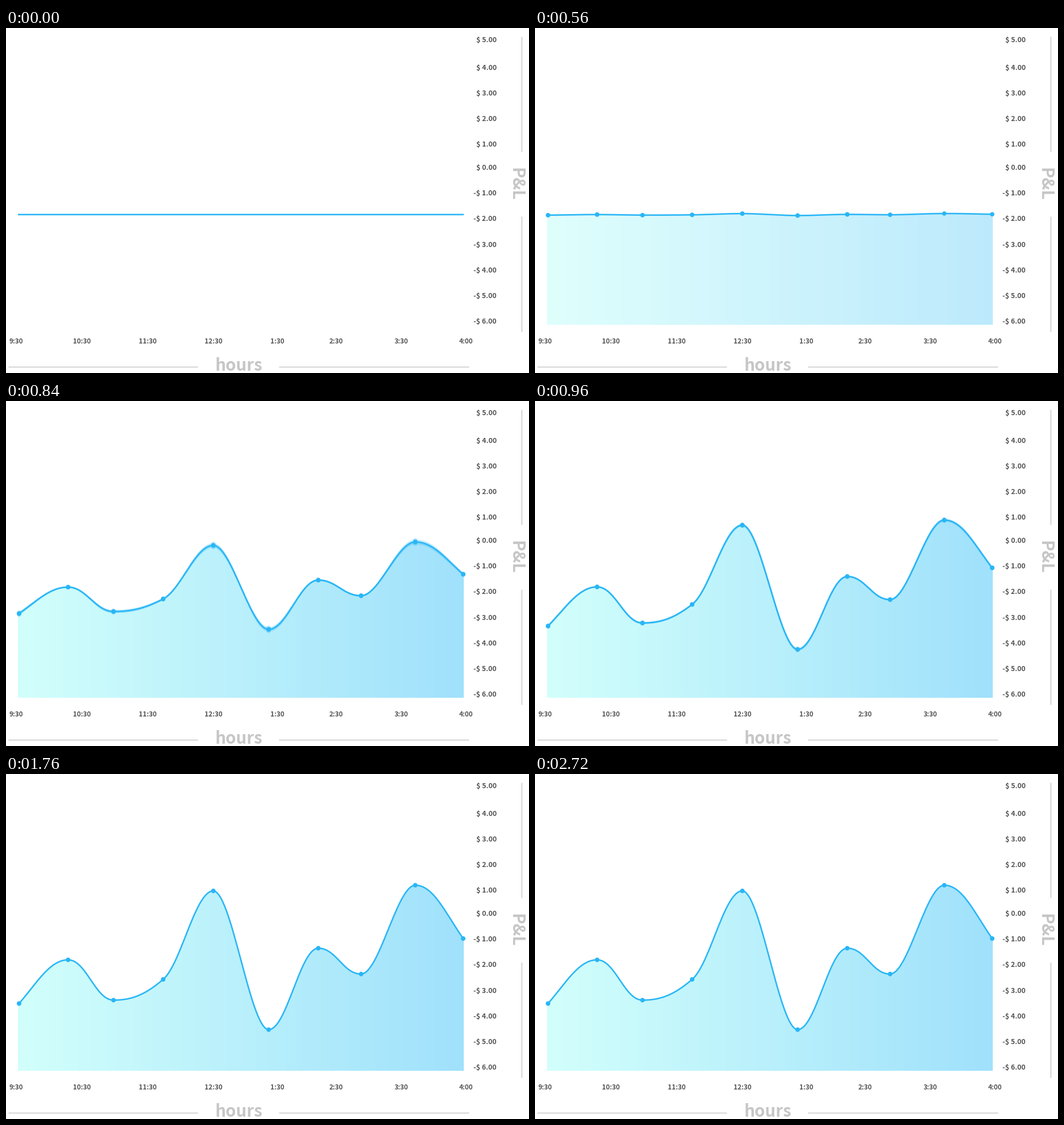
Write a matplotlib script that moves like this. It is 922x608 px and loops after 2.8 s.

```python
import numpy as np
import matplotlib.pyplot as plt
from matplotlib.animation import FuncAnimation
from matplotlib.path import Path

W, H, DPI = 922, 608, 100
STEP, FRAMES = 40, 70
PX = 72 / DPI

BLUE, GREY, RULE, INK = "#29b6f6", "#c6c6c6", "#b2b2b2", "#555555"
FILL_A, FILL_B = np.array([210, 255, 251]), np.array([160, 225, 252])
LEFT, RIGHT, FLOOR, BASE = 21, 807, 523, 328.8

DOTS = np.array([(23, 404.5), (109.5, 327.5), (189.5, 398.5), (277, 362),
                 (365.5, 206), (463, 450.5), (550.5, 307), (626, 352.5),
                 (721.5, 196), (806, 290)])
REACH = 32      # horizontal length of every curve handle
END_BEND = 1.3  # how much steeper the ends are than their chords
POP = np.linspace(40, 395, len(DOTS))

plt.rcParams["font.family"] = ["Noto Sans CJK JP", "DejaVu Sans"]
fig = plt.figure(figsize=(W / DPI, H / DPI), dpi=DPI, facecolor="white")
ax = fig.add_axes([0, 0, 1, 1])
ax.axis("off")


def label(x, y, text, size, color, **kw):
    ax.text(x, y, text, fontsize=size * PX, color=color, weight="bold",
            va="baseline", parse_math=False, **kw)


def rule(xs, ys):
    ax.plot(xs, ys, color=RULE, lw=PX, solid_capstyle="butt")


def slopes(points):
    """Flat at peaks and valleys, geometric mean of the chords elsewhere."""
    dx, dy = np.diff(points, axis=0).T
    chord = dy / dx
    before, after = chord[:-1], chord[1:]
    inner = np.sign(before) * np.sqrt(np.maximum(before * after, 0))
    return np.concatenate([[END_BEND * chord[0]], inner, [END_BEND * chord[-1]]])


def smooth_curve(points, n=30):
    """Bezier chain through the points, extended to the fill edges."""
    tangent = np.column_stack([np.ones(len(points)), slopes(points)])
    handle = REACH * tangent
    u = np.linspace(0, 1, n, endpoint=False)[:, None]
    parts = [points[:1] + (LEFT - points[0, 0]) * tangent[:1]]
    for a, b, ha, hb in zip(points, points[1:], handle, handle[1:]):
        parts.append(a * (1 - u) ** 3 + 3 * (a + ha) * u * (1 - u) ** 2
                     + 3 * (b - hb) * u ** 2 * (1 - u) + b * u ** 3)
    parts.append(points[-1:] + (RIGHT - points[-1, 0]) * tangent[-1:])
    return np.vstack(parts)


def rise(t):
    """Cubic ease in and out."""
    u = np.clip((t - 450) / 725, 0, 1)
    return 4 * u ** 3 if u < 0.5 else 1 - 4 * (1 - u) ** 3


def radius(t):
    """Each dot springs open in turn."""
    s = np.maximum(t - POP, 0)
    return 4 * (1 - np.exp(-s / 70) * np.cos(2 * np.pi * s / 200))


def lift(points, t):
    x, y = points.T
    return np.column_stack([x, BASE + (y - BASE) * rise(t)])


# Axis labels and rules
for value in range(5, -7, -1):
    y = np.interp(value, [-6, 0, 1, 4, 5], [516.5, 245.5, 204.5, 69, 20.5])
    sign = "-" if value < 0 else ""
    label(865, y + 4.5, f"{sign}$ {abs(value)}.00", 12.4, INK, ha="right")

for i in range(8):
    x = np.interp(i, [0, 3, 4, 5, 7], [18, 366, 478, 581.5, 811.5])
    text = f"{(8 + i) % 12 + 1}:30" if i < 7 else "4:00"
    label(x, 556, text, 11.8, INK, ha="center")

label(410.5, 603.5, "hours", 29.5, GREY, ha="center")
label(890, 275, "P&L", 29.5, GREY, ha="center", rotation=-90, rotation_mode="anchor")
for xs in ((4, 338), (481, 816)):
    rule(xs, (596.5, 596.5))
for ys in ((15, 218), (332, 535)):
    rule((908.5, 908.5), ys)

# Chart parts
mix = np.linspace(0, 1, 256)[None, :, None]
shade = (FILL_A * (1 - mix) + FILL_B * mix) / 255
fill = ax.imshow(shade, extent=(LEFT, RIGHT, FLOOR, 150), aspect="auto",
                 interpolation="bilinear", zorder=3)
curve = smooth_curve(DOTS)


def make_layer(alpha):
    line, = ax.plot(*curve.T, color=BLUE, lw=2.6 * PX, alpha=alpha,
                    solid_capstyle="butt", snap=False, zorder=4)
    dots = ax.scatter(*DOTS.T, color=BLUE, linewidths=0, alpha=alpha, zorder=5)
    return line, dots


# Motion blur: faint copies a few milliseconds to either side
layers = [(dt, *make_layer(0.2 if dt else 1)) for dt in (-7, -3.5, 3.5, 7, 0)]

ax.set_xlim(0, W)
ax.set_ylim(H, 0)


def draw(i):
    t = i * STEP
    moving = 0.02 < rise(t) < 0.98
    for dt, line, dots in layers:
        line.set_visible(moving or dt == 0)
        dots.set_visible(moving or dt == 0)
        line.set_data(*lift(curve, t + dt).T)
        dots.set_offsets(lift(DOTS, t + dt))
        dots.set_sizes((2 * radius(t) * PX) ** 2)
    top = lift(curve, t)
    area = np.vstack([top, [(RIGHT, FLOOR), (LEFT, FLOOR)], top[:1]])
    fill.set_clip_path(Path(area), ax.transData)
    fill.set_alpha(float(np.clip((t - 430) / 186, 0, 1)))
    return []


anim = FuncAnimation(fig, draw, frames=FRAMES, interval=STEP, repeat=True,
                     repeat_delay=0, blit=False)
plt.show()
```
